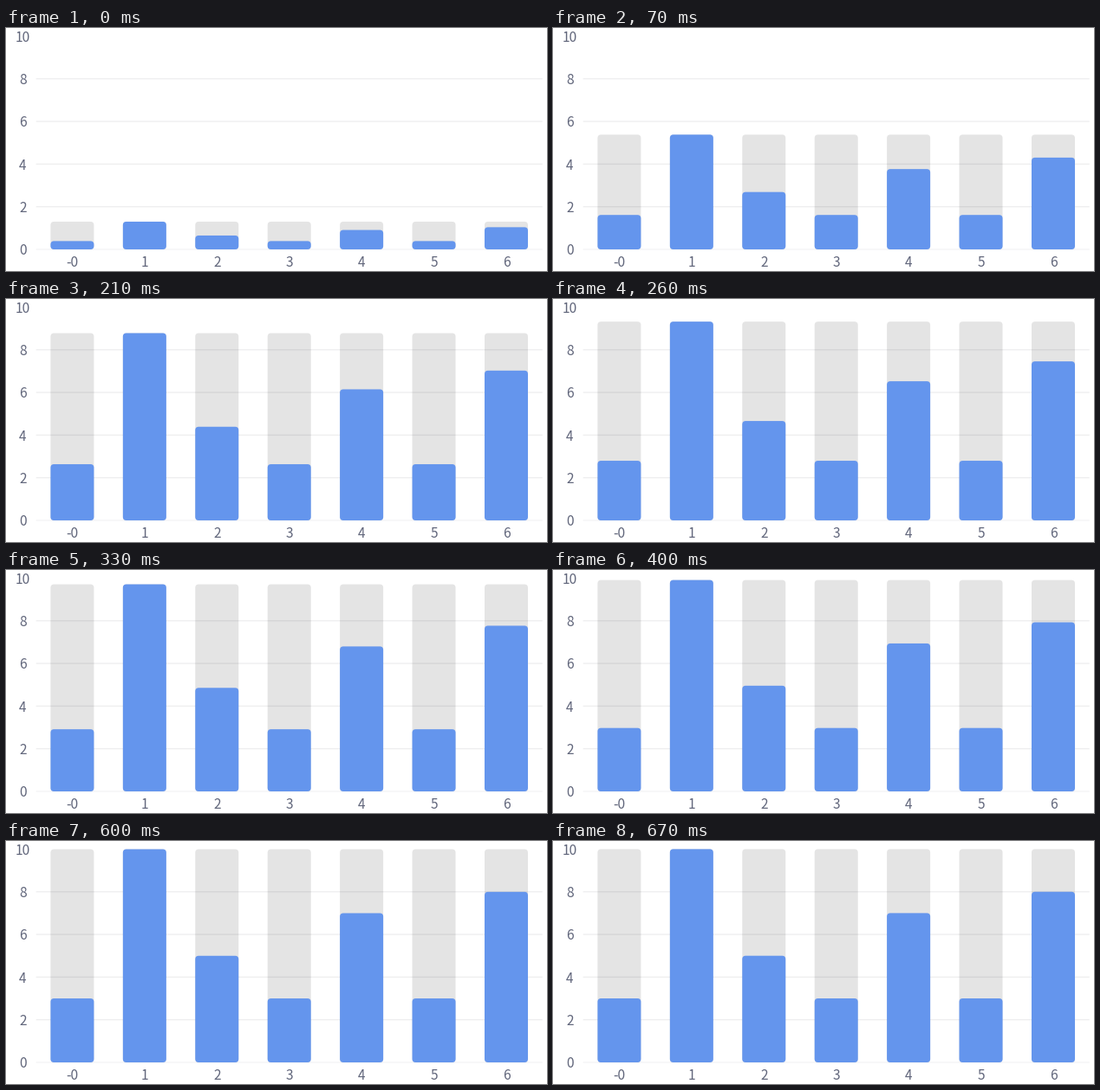
A matplotlib script for the animation above (0.74 s loop, 624 by 281 pixels).

```python
import matplotlib.pyplot as plt
from matplotlib.animation import FuncAnimation
from matplotlib.patches import FancyBboxPatch

W, H, DPI = 624, 281, 128
PX = 72 / DPI                  # points per pixel
LOOP, TICK = 740, 10           # ms
BASE, UNIT = 256, 24.66        # axis zero and pixels per value
LEFT, RIGHT, BAR_W = 34.7, 618.7, 50
VALUES = [3, 10, 5, 3, 7, 3, 8]
NAMES = ["-0", "1", "2", "3", "4", "5", "6"]

# Growth of the bars: (start in ms, share of the full height)
STEPS = [(0, 0.130), (70, 0.538), (140, 0.756), (210, 0.878), (260, 0.932),
         (330, 0.971), (400, 0.991), (530, 0.9965), (600, 0.9995), (670, 1)]

fig = plt.figure(figsize=(W / DPI, H / DPI), dpi=DPI, facecolor="white")
ax = fig.add_axes([0, 0, 1, 1])
ax.set_xlim(0, W)
ax.set_ylim(H, 0)
ax.axis("off")


def label(x, y, text):
    ax.text(x, y + 6, text, ha="center", va="baseline", color="#62677c",
            family="Noto Sans CJK JP", size=15.5 * PX)


def bar(x, color, alpha=1):
    style = "round,pad=0,rounding_size=4"
    patch = FancyBboxPatch((x, BASE - 10), BAR_W, 10, boxstyle=style,
                           facecolor=color, alpha=alpha, linewidth=0,
                           edgecolor="none", snap=False)
    return ax.add_patch(patch)


for v in range(0, 11, 2):
    y = BASE - v * UNIT
    label(19.3, y + 0.4, str(v))
    if v < 10:
        ax.plot([LEFT, RIGHT], [y, y], color="#eeeeef" if v else "#f3f3f5",
                lw=1.3 * PX, solid_capstyle="butt", snap=False, zorder=0)

band = (RIGHT - LEFT) / len(VALUES)
centers = [LEFT + band * (i + 0.5) for i in range(len(VALUES))]
for x, name in zip(centers, NAMES):
    label(x, 270, name)

starts = [x - BAR_W / 2 for x in centers]
backs = [bar(x, "black", 0.105) for x in starts]
bars = [bar(x, "#6495ed") for x in starts]


def set_height(patch, value):
    h = value * UNIT
    patch.set_y(BASE - h)
    patch.set_height(h)


def update(i):
    t = i * TICK
    grow = [p for start, p in STEPS if start <= t][-1]
    for back, front, value in zip(backs, bars, VALUES):
        set_height(back, 10 * grow)
        set_height(front, value * grow)
    return backs + bars


anim = FuncAnimation(fig, update, frames=LOOP // TICK, interval=TICK,
                     repeat=True, repeat_delay=0, blit=False)
plt.show()
```
